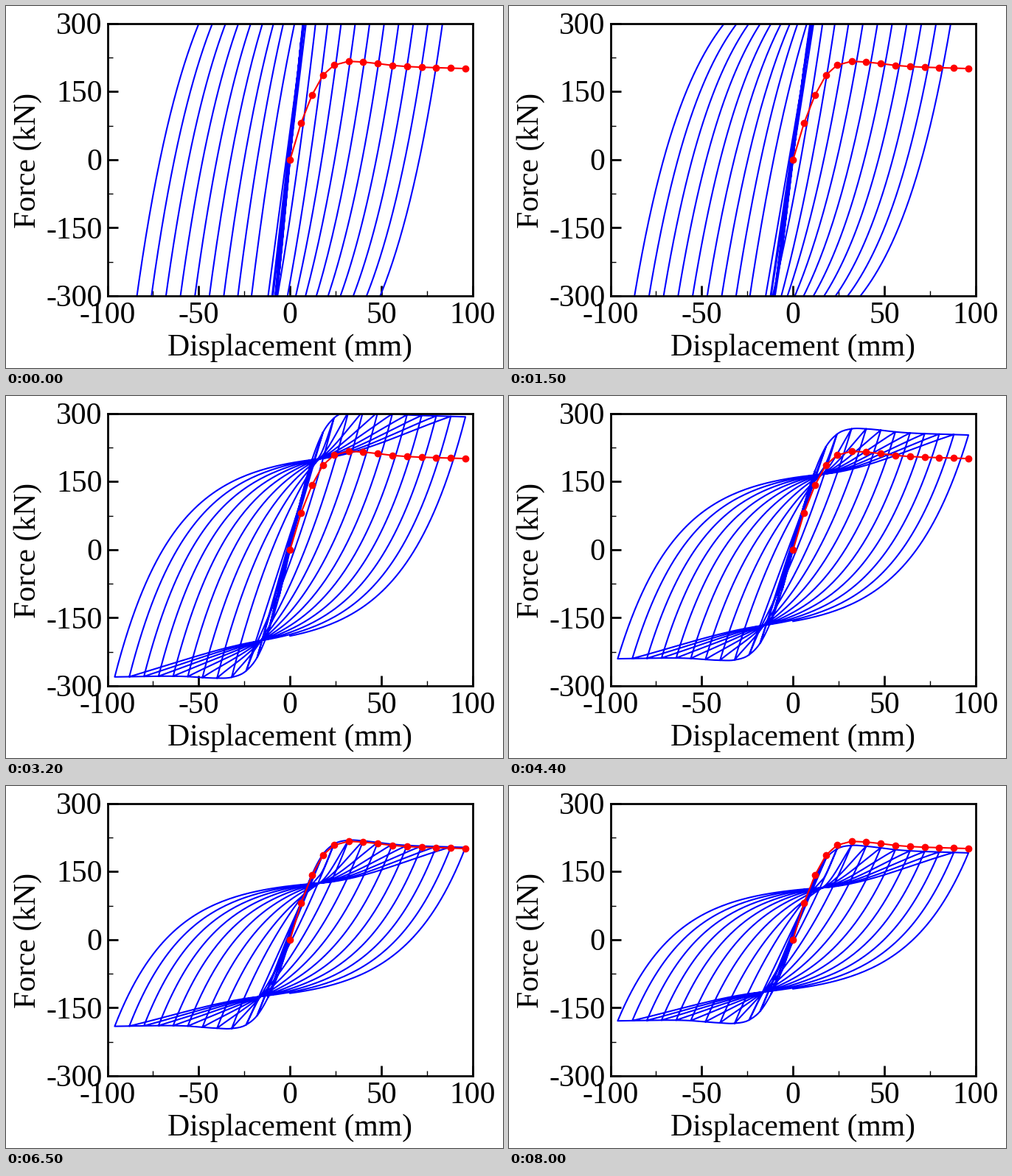
These frames come from a looping animation (674 px wide and 492 px high, 8.1 s). A matplotlib script:

```python
import numpy as np
import matplotlib.pyplot as plt
from matplotlib.animation import FuncAnimation

WIDTH, HEIGHT, DPI = 674, 492, 100
FRAMES, INTERVAL = 81, 100
LEFT, RIGHT, TOP, BOTTOM = 137.5, 633, 24, 394
FONT = dict(family="Liberation Serif", size=30)

# Measured envelope (mm, kN); its stations are also the cycle amplitudes.
ENV_X = np.array([0, 6, 12, 18, 24, 32, 40, 48, 56, 64, 72, 80, 88, 96.0])
ENV_F = np.array([0, 81, 142.5, 186.5, 208.5, 217, 215.5, 212, 208, 205.5,
                  204, 203, 202, 201])
ENV_SLOPE = np.gradient(ENV_F, ENV_X)

# Excess strength of the model over the envelope as the fit converges.
FIT_FRAME = [0, 9, 15, 18, 27, 32, 36, 45, 52, 54, 63, 65, 72, 80]
FIT_EXCESS = [538, 518, 368, 285, 119, 92, 67.5, 50, 26.5, 26, 7, 2.5, -3.5, -9.5]

PINCH_X = 16


def hermite(x, x0, y0, m0, x1, y1, m1):
    h = x1 - x0
    t = (x - x0) / h
    return ((1 + 2 * t) * (1 - t) ** 2 * y0 + t * (1 - t) ** 2 * h * m0
            + t * t * (3 - 2 * t) * y1 + t * t * (t - 1) * h * m1)


def backbone(x, excess, side):
    """Force magnitude on first loading; the negative side is a bit weaker."""
    x = np.asarray(x, float)
    i = np.clip(np.searchsorted(ENV_X, x, side="right") - 1, 0, len(ENV_X) - 2)
    env = hermite(x, ENV_X[i], ENV_F[i], ENV_SLOPE[i],
                  ENV_X[i + 1], ENV_F[i + 1], ENV_SLOPE[i + 1])
    gain = excess if side > 0 else excess - 31 + 0.19 * x
    return env + gain * np.tanh(x / 17)


def decay_length(reach, ratio):
    """Solve L * (1 - exp(-reach / L)) = ratio."""
    low, high = 3.0, 2000.0
    for _ in range(40):
        mid = (low + high) / 2
        if mid * (1 - np.exp(-reach / mid)) < ratio:
            low = mid
        else:
            high = mid
    return low


def stroke(start_x, peak_x, end_x, excess, side):
    """Half cycle from -start_x through the earlier peak and on to end_x."""
    start = -float(backbone(start_x, excess, -side))
    peak = float(backbone(peak_x, excess, side))
    if peak_x <= 18:
        x, force = np.array([-start_x, peak_x]), np.array([start, peak])
    else:
        strength = 195 + excess
        stiffness = (1.9 * strength - 43) / 32
        reach = start_x + PINCH_X
        straight = start + (peak - start) * reach / (start_x + peak_x)
        pinch = 0.843 * strength - 41.7
        pinch += (straight - pinch) * np.clip((32 - peak_x) / 14, 0, 1)

        length = decay_length(reach, (pinch - start) / stiffness)
        u = np.linspace(0, reach, 60)
        rise = start + stiffness * length * (1 - np.exp(-u / length))
        slope = stiffness * np.exp(-reach / length)
        mean = (peak - rise[-1]) / (peak_x - PINCH_X)
        x2 = np.linspace(PINCH_X, peak_x, 30)[1:]
        tail = hermite(x2, PINCH_X, rise[-1], slope, peak_x, peak, 1.05 * mean)
        x, force = np.r_[u - start_x, x2], np.r_[rise, tail]
    x3 = np.linspace(peak_x, end_x, 12)
    x = np.r_[x, x3]
    force = np.r_[force, backbone(x3, excess, side)]
    return side * x, side * force


def hysteresis(excess):
    x = np.linspace(0, ENV_X[1], 12)
    parts = [(-x, -backbone(x, excess, -1))]
    for prev, amp in zip(ENV_X, ENV_X[1:]):
        if prev:
            parts.append(stroke(prev, prev, amp, excess, -1))
        parts.append(stroke(amp, max(prev, 6), amp, excess, 1))
    x, force = stroke(amp, amp, amp, excess, -1)
    # The last unloading stops at zero displacement.
    x_end = np.r_[x[x > 0], 0]
    parts.append((x_end, np.interp(-x_end, -x[:80], force[:80])))
    return np.hstack(parts)


fig = plt.figure(figsize=(WIDTH / DPI, HEIGHT / DPI), dpi=DPI, facecolor="white")
ax = fig.add_axes([LEFT / WIDTH, 1 - BOTTOM / HEIGHT,
                   (RIGHT - LEFT) / WIDTH, (BOTTOM - TOP) / HEIGHT])
ax.set(xlim=(-100, 100), ylim=(-300, 300))
ax.set_xticks(range(-100, 101, 50))
ax.set_yticks(range(-300, 301, 150))
ax.set_xticks(range(-75, 76, 50), minor=True)
ax.set_yticks(range(-225, 226, 150), minor=True)
ax.tick_params(which="both", direction="in", labelbottom=False, labelleft=False)
ax.tick_params(which="major", length=10, width=2)
ax.tick_params(which="minor", length=5, width=1)
for spine in ax.spines.values():
    spine.set_linewidth(2)


def put_text(x, y, text, ha="center", **kw):
    fig.text(x / WIDTH, 1 - y / HEIGHT, text, ha=ha, va="baseline", **FONT, **kw)


for value in range(-100, 101, 50):
    put_text(LEFT + (value + 100) / 200 * (RIGHT - LEFT), 431, str(value))
for value in range(-300, 301, 150):
    put_text(130.5, TOP + (300 - value) / 600 * (BOTTOM - TOP) + 14,
             str(value), ha="right")
put_text(385, 474.5, "Displacement (mm)")
fig.text(39.5 / WIDTH, 1 - 210 / HEIGHT, "Force (kN)", rotation=90,
         rotation_mode="anchor", ha="center", va="baseline", **FONT)

loops, = ax.plot([], [], color="blue", lw=1.5)
ax.plot(ENV_X, ENV_F, "o-", color="red", lw=1.5, ms=6)


def update(frame):
    loops.set_data(*hysteresis(np.interp(frame, FIT_FRAME, FIT_EXCESS)))
    return loops,


anim = FuncAnimation(fig, update, frames=FRAMES, interval=INTERVAL,
                     repeat=True, repeat_delay=0)
plt.show()
```
